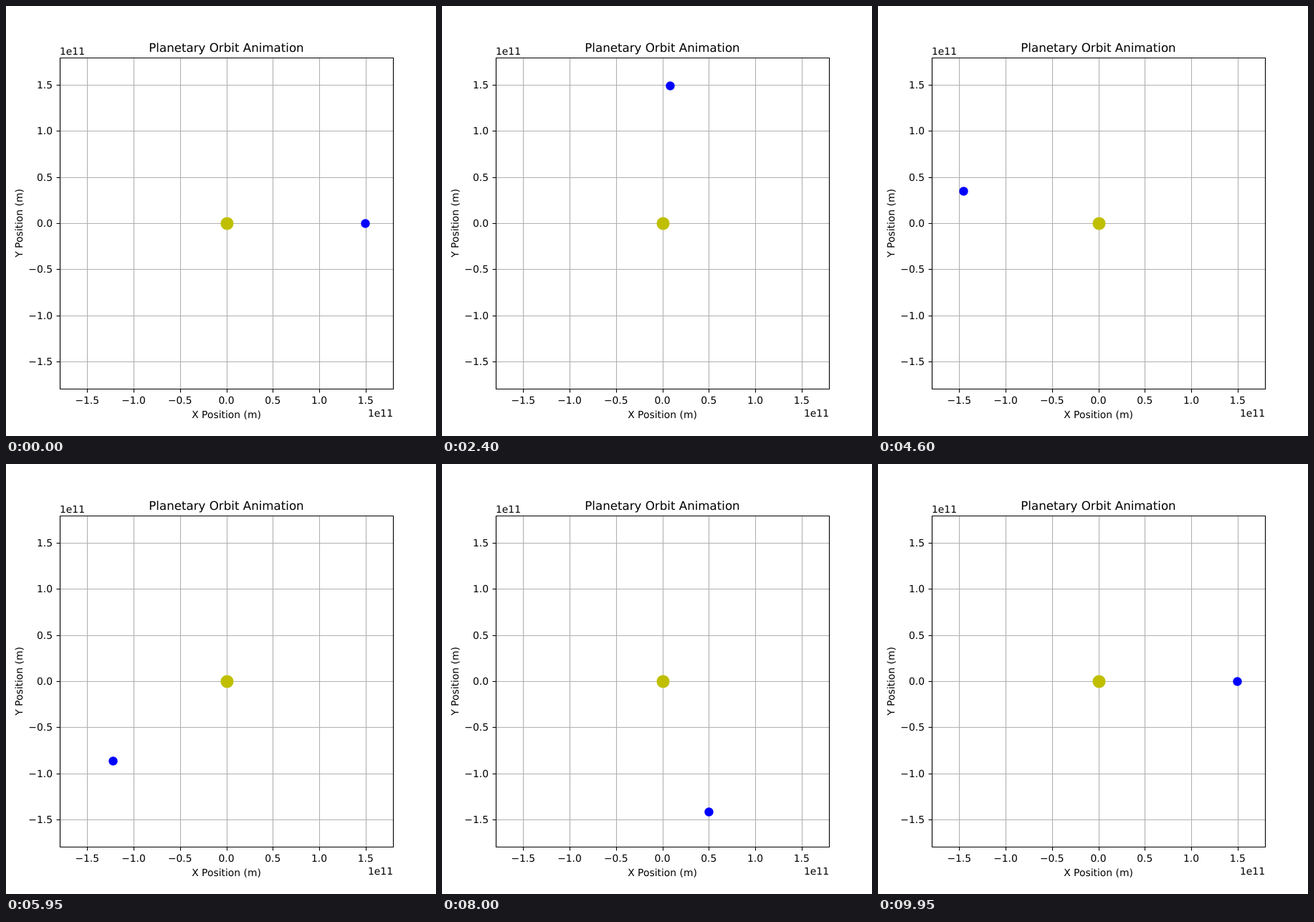
These frames come from a looping animation (600 px wide and 600 px high, 10000 ms). An HTML page:

```html
<!DOCTYPE html>
<html lang="en">
<head>
<meta charset="utf-8">
<title>Planetary Orbit Animation</title>
<style>
  html, body { margin: 0; width: 100%; height: 100%; overflow: hidden; background: #fff; }
  svg { display: block; width: 100vw; height: 100vh; }
  text { font: 13.889px "DejaVu Sans", sans-serif; fill: #000; text-rendering: geometricPrecision; }
  .title { font-size: 16.667px; }
  .line { stroke-width: 1.111; fill: none; }
  .grid { stroke: #b0b0b0; }
  .axis { stroke: #000; }
  .disc { stroke-width: 1.389; }
</style>
</head>
<body>
<svg id="stage" viewBox="0 0 600 600"></svg>
<script>
const LOOP = 10000, STEP = 50, STEPS = LOOP / STEP;
const BOX = { left: 75, right: 540, top: 72, bottom: 534 };
const CX = (BOX.left + BOX.right) / 2, CY = (BOX.top + BOX.bottom) / 2;
const ORBIT = 1.496, LIMIT = ORBIT * 1.2;
const SX = (BOX.right - BOX.left) / 2 / LIMIT;
const SY = (BOX.bottom - BOX.top) / 2 / LIMIT;

const stage = document.getElementById("stage");
const snap = v => Math.floor(v + 0.5) + 0.5;
const px = x => snap(CX + x * SX);
const py = y => snap(CY - y * SY);

function add(tag, attrs, text) {
  const el = document.createElementNS("http://www.w3.org/2000/svg", tag);
  for (const key in attrs) el.setAttribute(key, attrs[key]);
  if (text) el.textContent = text;
  return stage.appendChild(el);
}
const line = (d, kind) => add("path", { d, class: "line " + kind });
const label = (text, x, y, anchor, extra) =>
  add("text", { x, y, "text-anchor": anchor, ...extra }, text);
const disc = (x, y, r, color) =>
  add("circle", { cx: x, cy: y, r, fill: color, stroke: color, class: "disc" });

const ticks = [-1.5, -1, -0.5, 0, 0.5, 1, 1.5];
for (const v of ticks) {
  const x = px(v), y = py(v), name = v.toFixed(1).replace("-", "\u2212");
  line(`M${x} ${BOX.top}V${BOX.bottom}`, "grid");
  line(`M${BOX.left} ${y}H${BOX.right}`, "grid");
  line(`M${x} ${BOX.bottom + 0.5}v5`, "axis");
  line(`M${BOX.left + 0.5} ${y}h-5`, "axis");
  label(name, CX + v * SX, 555, "middle");
  label(name, 65, Math.floor(y) + 5, "end");
}

disc(px(0), py(0), 8.333, "#bfbf00");
const planet = disc(px(ORBIT), py(0), 5.556, "#0000ff");

line(`M${BOX.left + 0.5} ${BOX.top + 0.5}H${BOX.right + 0.5}V${BOX.bottom + 0.5}H${BOX.left + 0.5}Z`, "axis");
label("Planetary Orbit Animation", CX, 64, "middle", { class: "title" });
label("X Position (m)", CX, 575, "middle");
label("Y Position (m)", 0, 0, "middle", { transform: `translate(23 ${CY}) rotate(-90)` });
label("1e11", BOX.left, 68, "start");
label("1e11", BOX.right, 573, "end");

function draw(ms) {
  const i = Math.floor((ms % LOOP) / STEP);
  const a = i / (STEPS - 1) * 2 * Math.PI;
  planet.setAttribute("cx", px(ORBIT * Math.cos(a)));
  planet.setAttribute("cy", py(ORBIT * Math.sin(a)));
}

let start;
function tick(now) {
  start ??= now;
  draw(now - start);
  requestAnimationFrame(tick);
}
draw(0);
requestAnimationFrame(tick);
</script>
</body>
</html>
```
